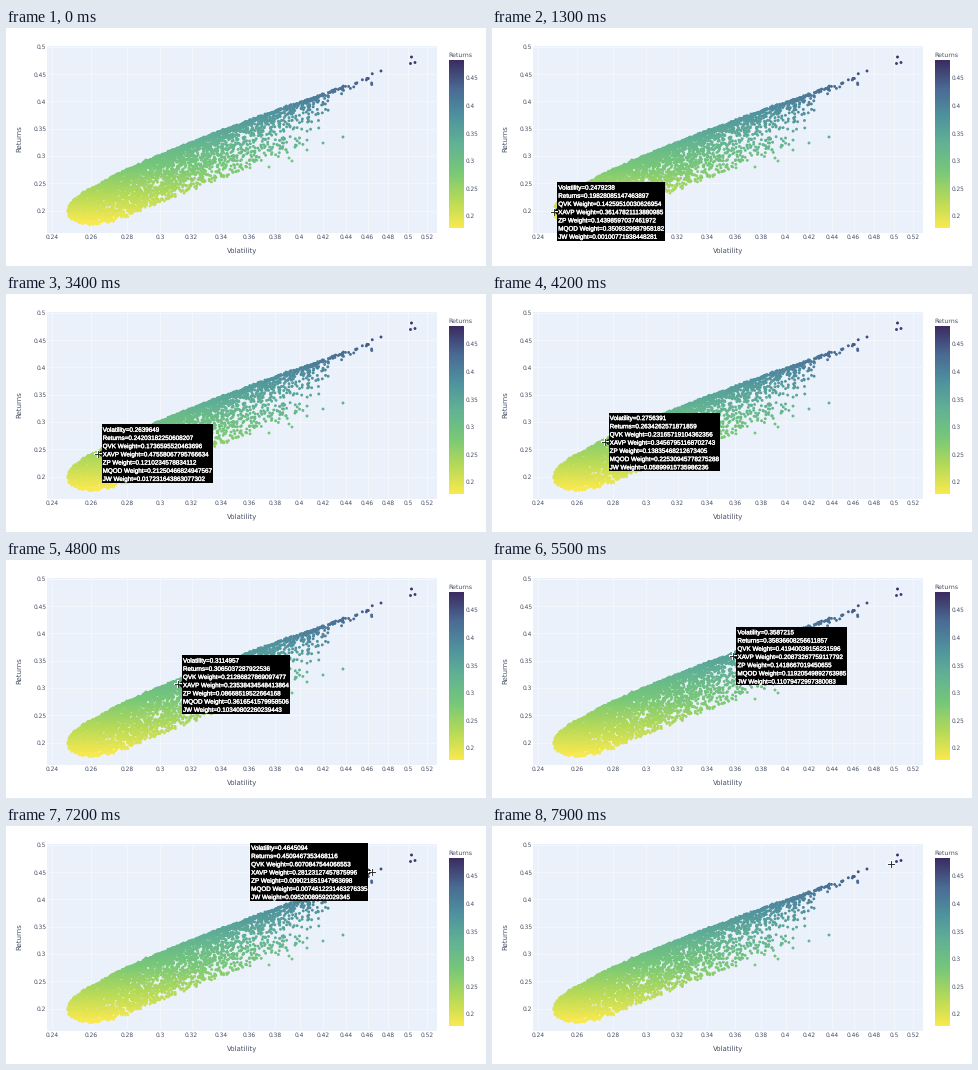
These frames come from a looping animation (480x238 px, 8000 ms). A matplotlib script:

```python
import numpy as np
import matplotlib.pyplot as plt
from matplotlib.animation import FuncAnimation
from matplotlib.colors import LinearSegmentedColormap
from matplotlib.patches import Polygon, Rectangle
from matplotlib.patheffects import withStroke

plt.rcParams["text.hinting"] = "none"

W, H, DPI = 480, 238, 100
FRAMES, INTERVAL = 80, 100
VMIN, VMAX = 0.177, 0.483
INK = "#465064"
RETURNS_MAP = LinearSegmentedColormap.from_list("returns", [
    "#fae94e", "#b5da58", "#78c878", "#62b294", "#4f929e", "#4a6a94", "#3c2c62"])
LABELS = ["Volatility", "Returns"] + [
    f"{name} Weight" for name in ("QVK", "XAVP", "ZP", "MQOD", "JW")]

# portfolios the pointer visits on its way up
VISIT_VOL = [0.2508069, 0.2756391, 0.3587215, 0.3973953, 0.4645094]
VISIT_RET = [0.21707045298307476, 0.2634262571871859, 0.35836608256611857,
             0.3949858022901366, 0.4509467353468116]


def to_x(vol):
    return 46 + 485 * np.log(np.asarray(vol) / 0.24)


def to_y(ret):
    return 19 + 545 * (0.5 - np.asarray(ret))


def to_vol(x):
    return 0.24 * np.exp((x - 46) / 485)


def to_ret(y):
    return 0.5 - (y - 19) / 545


def frontier(x):
    u = x - 62
    return 182 - 3.26 * np.sqrt(u) - 0.249 * u


def make_cloud():
    """Volatility and return of every portfolio, the visited ones first."""
    rng = np.random.default_rng(7)
    x = 62 + 290 * rng.beta(1.2, 2.4, 4300)
    u = x - 62
    depth = 47 * (1 - np.exp(-(u + 4) / 19)) * np.clip((352 - x) / 60, 0.15, 1)
    y = frontier(x) + depth * rng.random(len(x)) ** (1 + u / 95)
    x, y = x + rng.normal(0, 0.6, len(x)), y + rng.normal(0, 0.6, len(x))
    tail_x = rng.uniform(320, 368, 22)
    tail_y = frontier(tail_x) + rng.exponential(2, 22) - 1
    strays = np.array([(405.5, 29), (404.5, 35.5), (409, 34.5), (375, 43), (337, 109),
                       (317, 115), (301, 122), (286, 133), (283, 130), (263, 139)])
    x = np.concatenate([x, tail_x, strays[:, 0]])
    y = np.concatenate([y, tail_y, strays[:, 1]])
    return np.append(VISIT_VOL, to_vol(x)), np.append(VISIT_RET, to_ret(y))


fig = plt.figure(figsize=(W / DPI, H / DPI), dpi=DPI, facecolor="white")
ax = fig.add_axes([0, 0, 1, 1])
ax.axis("off")


def px(size):
    return size * 72 / DPI


def label(x, y, text, size=5.9, **kw):
    style = dict(ha="center", va="center_baseline", color=INK, family="DejaVu Sans")
    return ax.text(x, y, text, fontsize=px(size), **{**style, **kw})


def draw_axes():
    ax.add_patch(Rectangle((41, 18), 390, 187, fc="#ebf1fa", lw=0))
    grid = dict(color="#f4f7fc", lw=px(0.9), zorder=1)
    for vol in np.arange(24, 53, 2) / 100:
        x = to_x(vol)
        ax.plot([x, x], [18, 205], **grid)
        label(x, 209, f"{vol:g}")
    for ret in np.arange(20, 51, 5) / 100:
        y = to_y(ret)
        ax.plot([41, 431], [y, y], **grid)
        label(40.3, y, f"{ret:g}", ha="right")
    label(236, 222, "Volatility", 7)
    label(13, 111, "Returns", 7, rotation=90, va="center")


def draw_colorbar():
    ax.imshow(np.linspace(1, 0, 256)[:, None], cmap=RETURNS_MAP,
              extent=(443, 457.5, 200, 32), aspect="auto", zorder=2)
    label(442.5, 26.5, "Returns", 6.3, ha="left")
    for ret in np.arange(20, 46, 5) / 100:
        label(459.5, 188 - 552 * (ret - 0.2), f"{ret:g}", 5.8, ha="left")


cloud_vol, cloud_ret = make_cloud()
cloud_x, cloud_y = to_x(cloud_vol), to_y(cloud_ret)
draw_axes()
draw_colorbar()
ax.scatter(cloud_x, cloud_y, s=px(2.9) ** 2, c=cloud_ret, cmap=RETURNS_MAP,
           vmin=VMIN, vmax=VMAX, lw=0, zorder=3)
ax.set(xlim=(0, W), ylim=(H, 0))

box = ax.add_patch(Rectangle((0, 0), 1, 1, fc="black", lw=0, zorder=5))
caret = ax.add_patch(Polygon([(0, 0)] * 3, fc="black", lw=0, zorder=5))
lines = [label(0, 0, "", 6.3, ha="left", color="white", family="Liberation Sans", zorder=6,
               path_effects=[withStroke(linewidth=px(0.35), foreground="white")])
         for _ in LABELS]
cursor = [ax.plot([], [], color=c, lw=px(w), zorder=7)[0]
          for c, w in (("white", 2), ("#222222", 0.9))]

# pointer: in from the left, a short rest, up the frontier, off the last dots
PATH_T = [0, 1300, 2200, 2400, 2500, 4200, 5500, 6300, 7200, 7900]
PATH_X = [-10, 62, 66, 66, *to_x(VISIT_VOL), 399]
PATH_Y = [190, 184, 176, 176, *to_y(VISIT_RET), 38]


def portfolio(i):
    """Volatility, return and five weights that drift with the return."""
    calm = np.array([0.09, 0.40, 0.13, 0.36, 0.02])
    bold = np.array([0.62, 0.16, 0.04, 0.02, 0.16])
    mix = np.clip((cloud_ret[i] - 0.2) / 0.25, 0, 1)
    weights = np.random.default_rng(i).dirichlet(60 * (calm + mix * (bold - calm)))
    return [round(cloud_vol[i], 7), cloud_ret[i], *weights]


def show_tooltip(i):
    x, y = cloud_x[i], cloud_y[i]
    for line, name, value in zip(lines, LABELS, portfolio(i)):
        line.set_text(f"{name}={float(value)!r}")
    width = max(line.get_window_extent().width for line in lines) + 2.5
    fits = x + 3.5 + width < W
    left = x + 3.5 if fits else x - 4 - width
    near = left if fits else left + width
    box.set_bounds(left, y - 29.2, width, 58.4)
    caret.set_xy([(x, y), (near, y - 3.5), (near, y + 3.5)])
    for row, line in enumerate(lines):
        line.set_position((left + 1, y + 0.6 + 8.2 * (row - 3)))


def move_cursor(x, y, arm=3):
    for line in cursor:
        line.set_data([x - arm, x + arm, np.nan, x, x], [y, y, np.nan, y - arm, y + arm])


def update(frame):
    t = frame * INTERVAL
    x, y = np.interp(t, PATH_T, PATH_X), np.interp(t, PATH_T, PATH_Y)
    distance = np.hypot(cloud_x - x, cloud_y - y)
    nearest = int(distance.argmin())
    hovering = distance[nearest] < 5
    for artist in (box, caret, *lines):
        artist.set_visible(hovering)
    if hovering:
        show_tooltip(nearest)
    move_cursor(x, y)
    return [box, caret, *lines, *cursor]


anim = FuncAnimation(fig, update, frames=FRAMES, interval=INTERVAL,
                     repeat=True, repeat_delay=0, blit=False)
plt.show()
```
